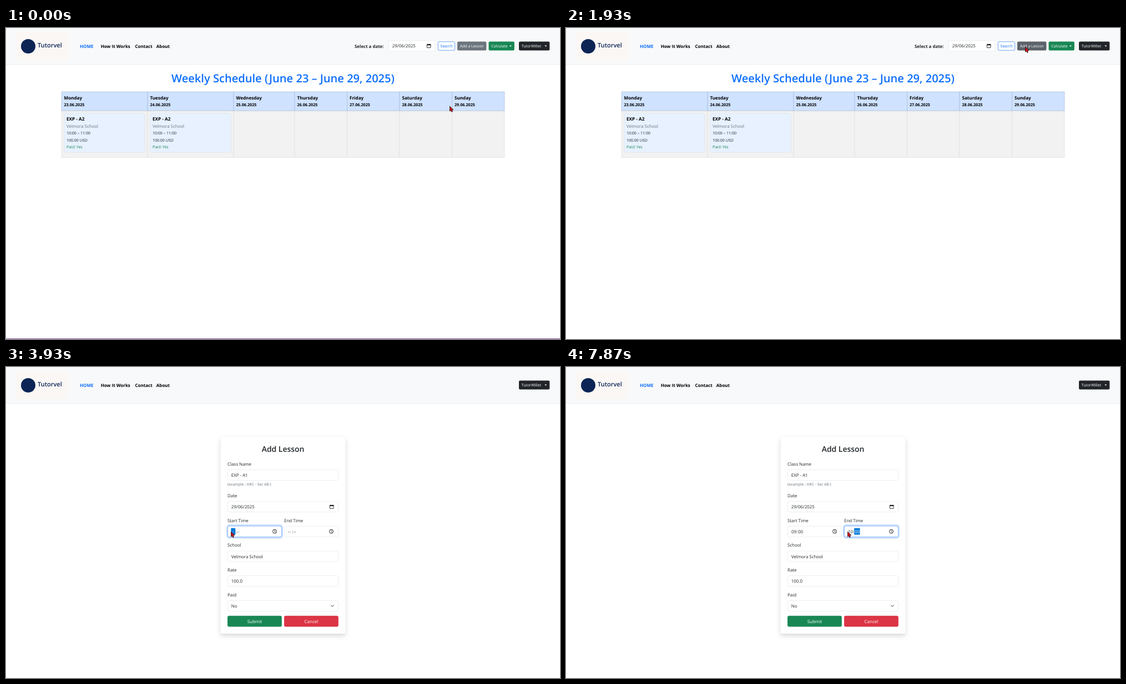
Animation, 998 px wide and 561 px high, one loop 8000 ms. Source, as an HTML page:

```html
<!DOCTYPE html>
<html lang="en">
<head>
<meta charset="utf-8">
<title>Lesson planner</title>
<style>
html, body { margin: 0; width: 100%; height: 100%; overflow: hidden; background: #fff; }
svg { display: block; width: 998px; height: 561px; }
text { font-family: "Open Sans", "Noto Sans", sans-serif; white-space: pre; text-rendering: geometricPrecision; }
.card { filter: drop-shadow(0 4px 4px rgba(0, 0, 0, .15)); }
</style>
</head>
<body>
<svg id="stage" viewBox="0 0 998 561"></svg>
<script>
const INK = '#212529', BLUE = '#0d6efd', GREEN = '#198754', GREY = '#6c757d', LINE = '#dee2e6';
const LOOP = 8000, FPS = 15;

// SVG builders
const text = (x, y, s, size = 7.9, fill = INK, weight = 400, anchor = 'start') =>
  `<text x="${x}" y="${y}" font-size="${size}" fill="${fill}" font-weight="${weight}" text-anchor="${anchor}">${s}</text>`;
const rect = (x, y, w, h, fill, r = 0, stroke = 'none', extra = '') =>
  `<rect x="${x}" y="${y}" width="${w}" height="${h}" rx="${r}" fill="${fill}" stroke="${stroke}" ${extra}/>`;
const path = (d, fill, stroke = 'none', w = 1) =>
  `<path d="${d}" fill="${fill}" stroke="${stroke}" stroke-width="${w}" stroke-linejoin="round" stroke-linecap="round"/>`;
const group = (id, body) => `<g id="${id}">${body}</g>`;

const THIN = 'stroke-width=".6"';
const input = (x, y, w, value = '') =>
  rect(x + .3, y + .3, w - .6, 19.2, '#fff', 3, LINE, THIN) + text(x + 6.8, y + 12.9, value);
const calendar = (x, y) =>
  path(`M${x + .5} ${y + 1.2}h6.2v5.8h-6.2z`, 'none', '#111', .8) +
  rect(x + .2, y + .7, 6.8, 1.9, '#111') + rect(x + 1.3, y, .9, 1, '#111') + rect(x + 5, y, .9, 1, '#111');
const clock = (x, y) =>
  `<circle cx="${x}" cy="${y}" r="3.5" fill="none" stroke="#111" stroke-width=".9"/>` +
  path(`M${x} ${y - 2}v2.2l1.5 1`, 'none', '#111', .8);
const caret = (x, y) => path(`M${x} ${y}h4l-2 2.1z`, '#fff');
const button = (x, w, label, fill, id = '') =>
  rect(x, 24.5, w, 16.1, fill, 2.1, 'none', id && `id="${id}"`) + text(x + 4.7, 35.3, label, 6.95, '#fff');

function nav() {
  const links = [[133, 'HOME', BLUE], [170.7, 'How It Works'], [232.5, 'Contact'], [270.8, 'About']];
  return rect(0, 0, 998, 66, '#f8f9fa', 0, 'none', 'id="bar"') +
    rect(0, 65.6, 998, .6, '#dfe1e4', 0, 'none', 'id="edge"') +
    group('logo', rect(18.5, 7, 94, 51, '#faf7f5') +
      '<circle cx="40" cy="33" r="13" fill="#0c2555"/>' + text(57, 35, 'Tutorvel', 11, '#0c2555', 600)) +
    group('links', links.map(([x, s, c = '#000']) => text(x, 35.6, s, 8, c, 700)).join('') +
      button(924, 55.3, 'TutorWillet', INK) + caret(970.3, 31.6));
}

function tools() {
  return text(628, 35.5, 'Select a date:', 7.9, INK, 700) +
    input(689, 22.4, 84.5, '29/06/2025') + calendar(758.3, 28.6) +
    rect(778.3, 24.8, 30.2, 15.5, '#fff', 2.1, BLUE, THIN) + text(793.5, 35.3, 'Search', 6.95, BLUE, 400, 'middle') +
    button(813, 52.3, 'Add a Lesson', GREY, 'add') +
    button(869.5, 46.3, 'Calculate', GREEN) + caret(907, 31.6);
}

function lesson(x) {
  return rect(x + .3, 153.6, 145.6, 71, '#e7f1ff', 3, LINE, THIN) +
    text(x + 4.5, 167, 'EXP - A2', 8.2, '#000', 700) +
    text(x + 4.5, 179.8, 'Velmora School', 7.9, GREY) +
    text(x + 4.5, 192.1, '10:00 – 11:00', 7) +
    text(x + 4.5, 204.6, '100.00 USD', 7) +
    text(x + 4.5, 217.1, 'Paid: Yes', 7, GREEN);
}

function week() {
  const names = ['Monday', 'Tuesday', 'Wednesday', 'Thursday', 'Friday', 'Saturday', 'Sunday'];
  const cols = [100, 255, 410, 520, 614.5, 709, 803.5, 898];
  const days = names.map((name, i) => {
    const x = cols[i], w = cols[i + 1] - x;
    return rect(x, 149, w, 84.5, '#f2f2f2', 0, '#dadbdc', THIN) +
      rect(x, 115, w, 34.2, '#cfe2ff', 0, '#a6b5cc', THIN) +
      text(x + 4.5, 129, name, 8.1, '#000', 700) +
      text(x + 4.5, 141.4, `${23 + i}.06.2025`, 7.2, '#000', 700);
  });
  return tools() + text(499, 98.2, 'Weekly Schedule (June 23 – June 29, 2025)', 20.1, BLUE, 600, 'middle') +
    days.join('') + lesson(104.5) + lesson(259.5) +
    rect(0, 560, 998, 1, '#8a4f9e', 0, 'none', 'id="rule"');
}

function form() {
  const label = (y, s, x = 399) => text(x, y, s, 7.9);
  const action = (x, s, fill) => rect(x, 448.8, 97.8, 19.8, fill, 3) + text(x + 48.9, 461.6, s, 8, '#fff', 400, 'middle');
  return rect(386.6, 126, 224.8, 355, '#fff', 1.5, 'none', 'class="card"') +
    text(499, 152.7, 'Add Lesson', 13.9, INK, 600, 'middle') +
    label(177.7, 'Class Name') + input(399, 185, 200, 'EXP - A1') +
    text(399, 213.8, '(example : ARC - Sec 6B )', 6.9, GREY) +
    label(234.8, 'Date') + input(399, 242.1, 200, '29/06/2025') + calendar(583.3, 248.3) +
    label(279.5, 'Start Time') + label(279.5, 'End Time', 501) +
    group('times', '') + clock(484, 296.6) + clock(586, 296.6) +
    label(324.2, 'School') + input(399, 331.6, 200, 'Velmora School') +
    label(368.8, 'Rate') + input(399, 376.2, 200, '100.0') +
    label(413.5, 'Paid') + input(399, 420.9, 200, 'No') +
    path('M585.4 429.8l2.5 2.4 2.5-2.4', 'none', '#343a40', 1) +
    action(399, 'Submit', GREEN) + action(501, 'Cancel', '#dc3545');
}

const arrow = path('M.5 .5V9l1.9-1.6 1.5 3 1.5-.7-1.4-2.9 2.6-.2z', '#d8101c', '#250508', .8);
const hand = path('M-.6 .6q.9-1 1.6 0v3.5l3 .8q1 .4.8 1.6l-.6 3.3q-.3 1.2-1.4 1.2H.6q-.8 0-1.2-.8L-2.4 7q-.3-1.1.8-1l1 .7z', '#c81420', '#30060a', .8);

document.getElementById('stage').innerHTML =
  group('nav', nav()) + group('week', week()) + group('form', form()) +
  group('status', rect(0, 547.6, 94.8, 14, '#0d0d0d') + text(4.3, 556.8, '192.0.2.7:8080/new_lesson', 6.8, '#e4e4e4')) +
  group('pointer', group('arrow', arrow) + group('hand', hand));

const el = id => document.getElementById(id);
const show = (id, on) => el(id).setAttribute('visibility', on ? 'visible' : 'hidden');
const move = (id, x, y) => el(id).setAttribute('transform', `translate(${x} ${y})`);
const ramp = (t, from, span) => Math.min(1, Math.max(0, (t - from) / span));

// Pointer moves: start, end, x, y, ease-out power
const MOVES = [
  [60, 70, 814, 117, 1], [340, 1200, 827, 31, 2.2], [1400, 1470, 827, 34, 1],
  [2425, 3270, 393, 308, 3], [3270, 3800, 405, 297, 1.6],
  [5800, 6270, 490, 302, 1.2], [6270, 6600, 507, 297, 2]
];
function pointer(t) {
  let x = 799, y = 141;
  for (const [from, to, tx, ty, p] of MOVES) {
    const k = 1 - (1 - ramp(t, from, to - from)) ** p;
    x += (tx - x) * k;
    y += (ty - y) * k;
  }
  return [x, y];
}

// Time field; sel is 'h', 'm' or empty
function timeField(x, h, m, sel, focus) {
  const width = s => s === '--' ? 6.6 : 9;
  const hx = x + 7, cx = hx + width(h) + .3, mx = cx + 2.6;
  const part = (px, s, on) =>
    (on ? rect(px - .7, 290.6, width(s) + 1.3, 11.9, '#0078d7') : '') +
    text(px, 299.6, s, 7.9, on ? '#fff' : INK);
  const ring = focus ? rect(x - .8, 285.4, 99.4, 22.8, 'none', 4, BLUE, `stroke-width="2.2" opacity="${.27 * focus}"`) +
    rect(x + .3, 287, 97.2, 19.4, 'none', 3, '#86b7fe', `stroke-width=".8" opacity="${focus}"`) : '';
  return input(x, 286.8, 97.8) + ring + part(hx, h, sel === 'h') + text(cx, 299.6, ':') + part(mx, m, sel === 'm');
}

function draw(t) {
  const onForm = t >= 2070, bare = onForm && t < 2200;
  const [x, y] = pointer(t);
  const hover = !onForm && y < 41;

  show('week', !onForm);
  show('form', onForm);
  show('logo', !bare);
  show('rule', t < 1470);
  move('links', 0, bare ? -17.6 : 0);
  move('form', 0, bare ? -35.8 : 0);
  el('bar').setAttribute('height', bare ? 30 : 66);
  el('edge').setAttribute('y', bare ? 29.8 : 65.6);

  el('add').setAttribute('fill', hover ? '#5c636a' : GREY);
  el('status').setAttribute('opacity', hover ? 1 - ramp(t, 1800, 130) : 0);
  const pointing = hover && t < 1930;
  show('hand', pointing);
  show('arrow', !pointing);
  move('pointer', x, y);

  const second = ramp(t, 6600, 200), first = ramp(t, 3730, 200) - second;
  const selA = t < 3800 || t >= 6670 ? '' : t < 4530 ? 'h' : 'm';
  const selB = t < 6670 ? '' : t < 7470 ? 'h' : 'm';
  const hourA = t < 4470 ? '--' : t < 4530 ? '00' : '09';
  const hourB = t < 7200 ? '--' : t < 7470 ? '01' : '10';
  el('times').innerHTML =
    timeField(399, hourA, t < 4930 ? '--' : '00', selA, first) +
    timeField(501, hourB, t < 7870 ? '--' : '00', selB, second);
}

const start = performance.now();
function tick() {
  const t = (performance.now() - start) % LOOP;
  const step = Math.floor(t * FPS / 1000 + .06);
  draw(Math.round(step * 100 / FPS) * 10);
  requestAnimationFrame(tick);
}
tick();
</script>
</body>
</html>
```
